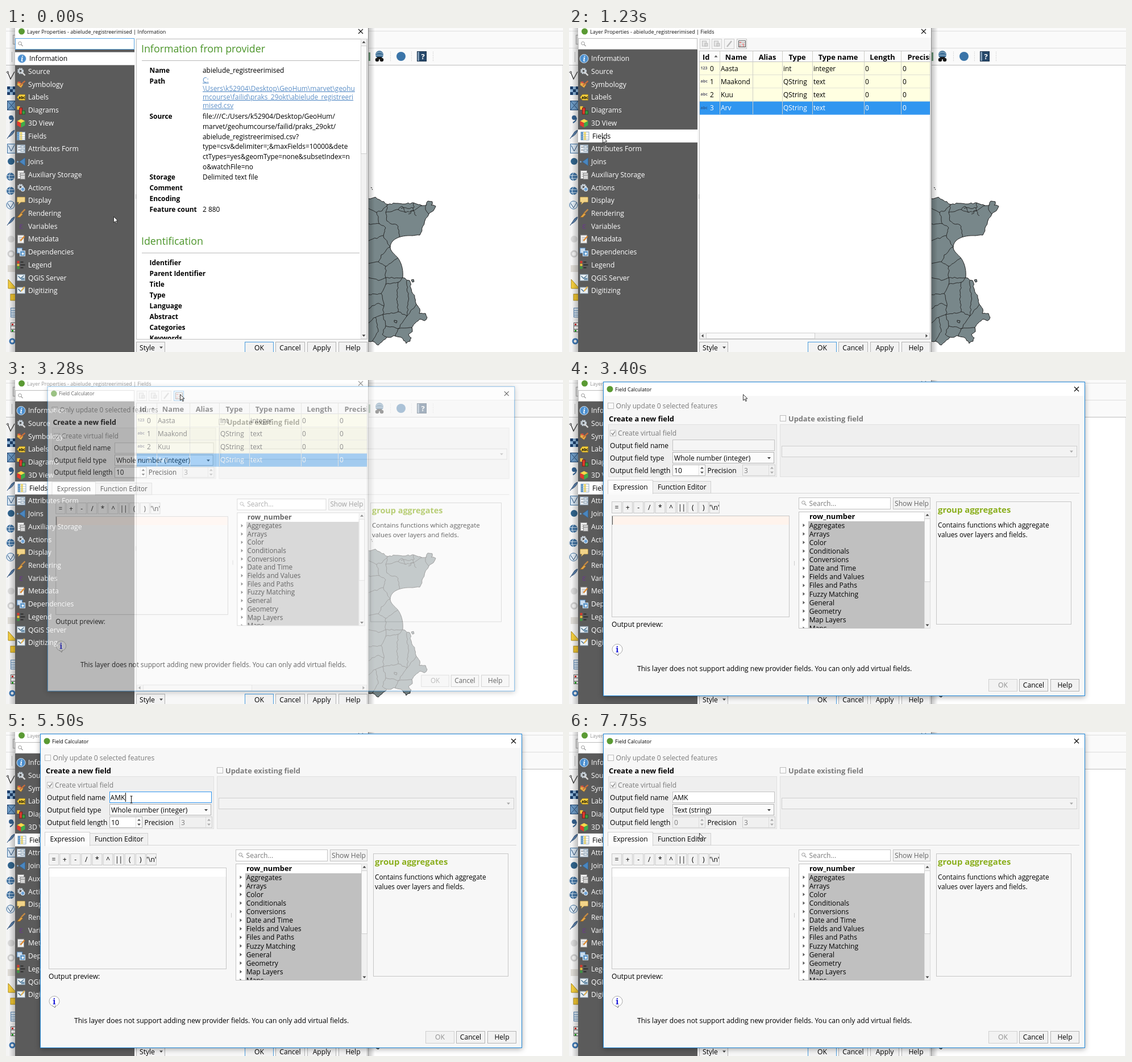
Animation, 980 px wide and 571 px high, one loop 8000 ms. Source, as an HTML page:

```html
<!DOCTYPE html>
<html lang="en">
<head>
<meta charset="utf-8">
<title>Field calculator</title>
<style>
html, body { margin: 0; width: 100%; height: 100%; overflow: hidden; background: #fff; }
svg { display: block; font: 12.1px "Open Sans", "Noto Sans", sans-serif; }
text { white-space: pre; }
</style>
</head>
<body>
<svg id="stage" width="980" height="571" viewBox="0 0 980 571"></svg>
<script>
const LOOP = 8000, GREY = '#7b7b7b', BLUE = '#3096f0', LINE = '#c3c3c3';

const esc = s => s.replace(/&/g, '&amp;').replace(/</g, '&lt;');
const text = (x, y, s, o = '') => `<text x="${x}" y="${y}" ${o}>${esc(s)}</text>`;
const bold = (x, y, s, size = 12.8, fill = '#000') =>
  text(x, y, s, `font-weight="700" font-size="${size}" fill="${fill}"`);
const mid = (x, y, s, o = '') => text(x, y, s, 'text-anchor="middle" ' + o);
const rect = (x, y, w, h, fill, stroke = 'none', o = '') =>
  `<rect x="${x}" y="${y}" width="${w}" height="${h}" fill="${fill}" stroke="${stroke}" ${o}/>`;
const box = (x1, y1, x2, y2, fill = '#fff', stroke = LINE, o = '') =>
  rect(x1 + .5, y1 + .5, x2 - x1 - 1, y2 - y1 - 1, fill, stroke, o);
const circle = (x, y, r, fill, o = '') => `<circle cx="${x}" cy="${y}" r="${r}" fill="${fill}" ${o}/>`;
const path = (d, stroke, w = 1, fill = 'none') =>
  `<path d="${d}" stroke="${stroke}" stroke-width="${w}" fill="${fill}"/>`;
const group = (id, s, o = '') => `<g id="${id}" ${o}>${s}</g>`;
const at = (x, y, s) => `<g transform="translate(${x} ${y})">${s}</g>`;
const tri = (x, y, dir, fill = '#444') => {
  const turn = { down: 0, left: 90, up: 180, right: 270 }[dir];
  return `<path transform="translate(${x} ${y}) rotate(${turn})" d="M-3-1.5H3L0 2z" fill="${fill}"/>`;
};
const lens = (x, y) => circle(x, y, 2.8, 'none', 'stroke="#999"') + path(`M${x + 2} ${y + 2}l3 3`, '#999', 1.3);
const cross = (x, y) => path(`M${x - 4} ${y - 4}l8 8m0-8l-8 8`, 'currentColor', 1.1);
const button = (x1, x2, y, s, stroke = '#b4b4b4', fill = '#000') =>
  box(x1, y, x2, y + 22, '#f2f2f2', stroke) + mid((x1 + x2) / 2, y + 15, s, `fill="${fill}"`);

// ---- main window behind the dialogs ----
let seed = 11;
const rnd = () => (seed = seed * 16807 % 2147483647) / 2147483647 - .5;
function rough(list) {
  const p = list.split(' ').map(s => s.split(',').map(Number));
  let d = 'M' + p[0];
  for (let i = 1; i < p.length; i++) {
    const [a, b] = [p[i - 1], p[i]];
    const n = Math.max(1, Math.round(Math.hypot(b[0] - a[0], b[1] - a[1]) / 4));
    for (let k = 1; k <= n; k++) {
      const j = k < n ? 2.8 : 0, f = k / n;
      d += `L${(a[0] + (b[0] - a[0]) * f + rnd() * j).toFixed(1)} ${(a[1] + (b[1] - a[1]) * f + rnd() * j).toFixed(1)}`;
    }
  }
  return d;
}
const coast = '630,304 641,301 650,298 658,303 672,311 686,309 703,310 717,308 732,313 740,311 742,305 750,306 748,312 756,314 752,322 744,328 738,337 733,350 728,365 715,366';
const coast2 = 'C700 365 676 369 676 387C677 396 688 401 692 409C697 418 699 428 698 440L';
const south = '698,440 710,445 713,460 719,475 722,487 728,495 727,503 738,503 741,510 736,516 728,513 720,520 714,528 715,535 708,540 713,546 711,552 704,556 695,545 685,543 670,545 664,550 655,559 645,552 630,551';
const borders = [
  '638,318 652,325 662,322 672,311', '652,325 657,345 668,352 664,366 676,386', '638,345 657,345',
  '668,325 690,320 703,325 717,322 732,313', '690,320 697,314 703,325', '717,308 717,322 708,328', '695,318 717,317',
  '672,311 668,325 670,340 690,350 692,368', '717,322 722,331', '740,311 738,320 744,328',
  '638,375 664,366', '638,415 655,412 660,400 676,386', '655,412 668,420 680,412 690,405',
  '638,440 655,445 668,440 698,440', '668,420 668,452 690,448 698,440', '638,470 660,468 668,452',
  '660,468 665,490 663,505 690,500 705,508 722,487', '690,448 688,470 690,500', '705,445 708,480 705,508',
  '638,495 655,485 665,490', '638,520 650,510 663,505 668,525 690,530 715,528',
  '650,510 655,535 645,552', '668,525 662,540 670,545', '685,543 690,530 700,515 705,508'
];
const land = path(rough(coast) + coast2 + rough(south).slice(1) + 'z', '#222', 1, '#78878a') +
  borders.map(b => path(rough(b), '#222', .9)).join('') +
  path('M713 444l4-1 1 4-3 1zM683 515l5 1-1 4-4-2z', '#222', 1, '#78878a') +
  path('M642 281l2 1M644 284l1 1', '#333', 1.3);

const globe = y => circle(8, y, 7, '#3d6f9e') + path(`M2 ${y - 2}h12M3 ${y + 3}h11M8 ${y - 7}q-5 7 0 14`, '#dbe8f2');
const feather = y => path(`M2 ${y + 8}L10 ${y - 4}Q14 ${y - 7} 15 ${y - 7}Q14 ${y} 5 ${y + 5}`, '#34547a', 1, '#5c81ab');
let tools = path('M3 78l5 12 7-13', '#333', 1.3) + circle(3, 78, 1.5, '#fff', 'stroke="#333"');
for (let i = 0; i < 9; i++) tools += rect(2 + i % 3 * 5, 103 + (i / 3 | 0) * 5, 5, 5, i % 2 ? '#8db3d6' : '#1d3f6b');
tools += box(2, 128, 18, 145, '#6f9cc6', '#274b75') + path('M3 129l13 15m0-15l-13 15', '#274b75') +
  circle(9, 158, 4, '#34618f') + path('M13 158q0 6-6 9', '#34618f', 2) + feather(187) +
  box(2, 204, 18, 221, '#d8e6f2', '#3d6f9e') + path('M4 207l5 10 6-11', '#274b75') +
  circle(9, 235, 6, '#31648c') + globe(262) + globe(287) +
  circle(8, 312, 7, '#e4eef6', 'stroke="#3d6f9e"') + path('M3 309l5 8 6-10', '#274b75') + feather(340) +
  circle(9, 372, 6, '#d9d9d9') + circle(9, 398, 5, 'none', 'stroke="#cfcfcf" stroke-width="3"') +
  rect(3, 418, 14, 12, '#dcd9d4') + path('M4 443v16h14z', '#a98a1c', 1, '#f6cf3d') +
  rect(8, 469, 10, 11, '#f3c832', '#a98a1c') +
  box(8, 493, 18, 510, '#dce8f3', '#5e87b0') + path('M9 498h8m-8 4h8m-8 4h8', '#5e87b0') +
  box(8, 519, 18, 536, '#fff', '#666') + path('M9 525h8m-8 6h8', '#555') + rect(10, 521, 3, 3, '#c22') + rect(10, 532, 3, 3, '#2a2') +
  circle(11, 552, 4, 'none', 'stroke="#3d78b5" stroke-width="3"');

const main = rect(0, 0, 980, 571, '#fff') + rect(0, 0, 980, 65, '#fafafa') + rect(0, 65, 16, 506, '#f4f4f4') +
  path('M0 5.5H980M0 35.5H980', '#dedede') + path('M0 65.5H980', '#bdbdbd') + path('M979.5 66V571', '#e6e6e6') +
  box(12, 12, 24, 29, '#eee', '#aaa') + path('M10.5 42v18', '#bbb', 1) + tools + land +
  [676.5, 713.5, 751.5].map(x => `<path d="M${x} 42v17" stroke="#bbb" stroke-dasharray="1 2"/>`).join('') +
  rect(636, 43, 5, 15, '#6d9a7a') +
  circle(657, 47, 7, '#3f6f96') + path('M651 45q6-5 12 0M650 48h14', '#a7c3d8') +
  circle(653, 56, 3.3, '#181818') + circle(661, 56, 3.3, '#181818') + rect(653, 51, 8, 4, '#181818') +
  circle(695, 50, 8, '#3a74a8') +
  box(723, 41, 740, 59, '#27496b', '#172f48') + rect(724, 42, 3, 16, '#7f9bb5') + mid(733.5, 55, '?', 'fill="#fff" font-weight="700" font-size="13"');

// ---- sidebar ----
const cube = path('M8 1l7 3.5-7 3.5-7-3.5z', 'none', 0, '#f7d94a') + path('M1 4.5l7 3.5v8l-7-4z', 'none', 0, '#e23b2e') + path('M15 4.5l-7 3.5v8l7-4z', 'none', 0, '#3fae49');
const sheet = rect(2, 1, 11, 14, '#f4f4f4', '#999') + path('M4 5h7M4 8h7M4 11h5', '#999');
const brush = path('M15 1L8 8', '#c48a45', 2.5) + path('M8 7l3 3-5 5H1z', '#8a5a1e', .8, '#e0a346');
const mapTile = rect(1, 2, 14, 11, '#e8eef2', '#8195a5') + path('M3 5l4 4 6-5', '#49718f', 1.4);
const gear = circle(7, 7, 4, 'none', 'stroke="#c9d2da" stroke-width="3" stroke-dasharray="2.2 1"') + circle(7, 7, 3, 'none', 'stroke="#c9d2da" stroke-width="2"');
const items = [
  ['Information', circle(8, 8, 7.5, '#4c8fcf', 'stroke="#d9e8f5"') + mid(8, 12.5, 'i', 'fill="#fff" font-family="Noto Serif, serif" font-style="italic" font-weight="700" font-size="12"')],
  ['Source', gear + path('M9 9l6 6', '#d8d8d8', 2.4)],
  ['Symbology', path('M2 3l10 5-4 6-7-5z', '#8a5a1e', .6, '#e7b24c') + path('M15 2L6 10', '#c96c3a', 2.5) + rect(3, 3, 4, 3, '#d94f45')],
  ['Labels', path('M1 8l4-5h10v10h-10z', '#a88415', .7, '#f6cf3d') + mid(9.5, 10.5, 'abc', 'font-size="6.5" font-weight="700"')],
  ['Diagrams', rect(1, 1, 5, 6, '#f0c53a') + rect(5, 4, 5, 11, '#d93a2f', '#7e1b14') + rect(10, 9, 5, 6, '#3c9a44', '#1f5a25')],
  ['3D View', cube],
  ['Fields', rect(1, 1, 14, 14, '#fff', '#8aa5bd') + rect(1, 1, 4, 14, '#5f97c9') + rect(6, 1, 4, 14, '#f3dc73') + path('M1 5h14M1 9h14M1 12h14', '#9fb4c6', .7)],
  ['Attributes Form', rect(1, 1, 14, 14, '#e8edf2', '#8aa0b5') + path('M3 5h3M3 10h3', '#555') + rect(7.5, 3, 6, 3, '#fff', '#6b87a0') + rect(7.5, 9, 6, 3, '#fff', '#6b87a0')],
  ['Joins', path('M5 8L15 1v14z', '#2c5f92', .7, '#4a86bf') + circle(2, 8, 1.5, '#7fa9cf')],
  ['Auxiliary Storage', sheet + rect(7, 5, 8, 11, '#d5d5d5', '#888') + path('M7 9h8', '#888')],
  ['Actions', gear + circle(11, 11, 3.5, '#6fa3d6', 'stroke="#fff"')],
  ['Display', path('M2 2h12q1 0 1 1v7q0 1-1 1H8l-5 4 1-4H2q-1 0-1-1V3q0-1 1-1z', '#a88738', .7, '#f2d489')],
  ['Rendering', brush],
  ['Variables', mid(8, 13, 'ε', 'font-size="15" fill="#6a3c8a"')],
  ['Metadata', sheet + path('M14 3L7 11', '#e08a2e', 2.2)],
  ['Dependencies', rect(1, 1, 9, 9, '#c9dcee', '#4a7fb5') + rect(6, 6, 9, 9, '#5f97c9', '#dce9f4') + circle(11, 11, 2, '#fff')],
  ['Legend', rect(1, 1, 4, 4, '#d93a2f') + rect(1, 6, 4, 4, '#e9c23b') + rect(1, 11, 4, 4, '#3c9a44') + path('M7 3h5M7 8h8M7 13h5', '#222', 1.5)],
  ['QGIS Server', mapTile + rect(8, 8, 6, 4, '#6f93ae')],
  ['Digitizing', mapTile + path('M14 1L8 9', '#e7b24c', 2)]
];
const rowY = i => 54 + 22.72 * i;
const side = sel => items.map(([name, icon], i) => {
  const on = i === sel, y = rowY(i);
  return (on ? rect(16, y - 11.4, 210, 22.8, '#fff') : '') + at(on ? 20 : 18.5, y - 8, icon) +
    text(on ? 41 : 39, y + 4.3, name, `fill="${on ? '#000' : '#fff'}"`);
}).join('');

// ---- information page ----
const field = (y, name, ...lines) => bold(252.5, y + 4.3, name, 11.9) +
  lines.map((s, i) => text(346, y + 4.3 + i * 17.7, s, 'font-size="11.9"')).join('');
const heading = (y, s) => text(238, y, s, 'font-size="17.8" fill="#4a9428"') + path(`M239 ${y + 14}.5H622`, '#b9b9b9');
const link = ['C:', '\\Users\\k52904\\Desktop\\GeoHum\\marvet\\geohu', 'mcourse\\failid\\praks_29okt\\abielude_registreeri', 'mised.csv'];
const vBar = (x, y1, y2, thumb) => box(x, y1, x + 11, y2, '#f1f1f1', '#dcdcdc') + box(x, y1 + 12, x + 11, thumb, '#fafafa', '#cfcfcf') +
  tri(x + 5.5, y1 + 6, 'up') + tri(x + 5.5, y2 - 6, 'down');
const info = box(229, 19, 636, 549) + '<clipPath id="clip"><rect x="230" y="20" width="394" height="528"/></clipPath>' +
  group('doc', heading(43, 'Information from provider') + field(75, 'Name', 'abielude_registreerimised') + field(94, 'Path') +
    link.map((s, i) => text(346, 95.5 + i * 15.2, s, 'font-size="11.9" fill="#5d90c8" text-decoration="underline"')).join('') +
    field(156, 'Source', 'file:///C:/Users/k52904/Desktop/GeoHum/', 'marvet/geohumcourse/failid/praks_29okt/', 'abielude_registreerimised.csv?',
      'type=csv&delimiter=;&maxFields=10000&dete', 'ctTypes=yes&geomType=none&subsetIndex=n', 'o&watchFile=no') +
    field(263, 'Storage', 'Delimited text file') + field(282, 'Comment') + field(301, 'Encoding') + field(320, 'Feature count', '2 880') +
    heading(382, 'Identification') +
    ['Identifier', 'Parent Identifier', 'Title', 'Type', 'Language', 'Abstract', 'Categories', 'Keywords'].map((s, i) => field(414 + 19 * i, s)).join(''),
    'clip-path="url(#clip)"') + vBar(624, 19, 548, 222);

// ---- fields page ----
const cols = [229, 265, 323, 375, 428, 519, 584, 635];
const rows = [['Aasta', 'int', 'integer'], ['Maakond', 'QString', 'text'], ['Kuu', 'QString', 'text'], ['Arv', 'QString', 'text']];
const abacus = rect(298.5, 22.5, 12, 11, '#fff', '#555') + path('M299 25.5h11M299 28.5h11M299 31.5h11', '#777', .8) +
  path('M300 25.5h3M305 28.5h3M300 31.5h2M306 31.5h2', '#c44', 1.4);
const dull = [239, 260, 282].map((x, i) => box(x - 9, 19, x + 9, 37, '#f4f4f4', '#cfcfcf') +
  (i < 2 ? rect(x - 4.5, 23, 7, 9, '#e6e6e6', '#bbb') + rect(x, 27, 5, 5, '#d9d9d9', '#bbb') : path(`M${x + 4} 23l-8 10`, '#bbb', 2.4))).join('');
const table = dull + box(295, 19, 313, 37, '#f4f4f4', '#c4c4c4', 'id="calcBtn"') + abacus +
  box(229, 40, 636, 549) + rect(230, 41, 405, 19, '#fbfbfb') + path('M230 59.5H635', LINE) +
  rows.map((r, i) => {
    const y = 60 + 23.2 * i, on = i === 3, b = y + 15.5, o = `font-size="11.9" fill="${on ? '#fff' : '#000'}"`;
    return rect(230, y, 405, 23.2, on ? BLUE : '#ffffe1') + path(`M230 ${y + 22.7}H635`, on ? '#5aaaf2' : '#d9d9cf') +
      text(231.5, b - 2.5, i ? 'abc' : '123', `font-size="7" font-weight="700" fill="${on ? '#2a5f9c' : '#5c5c70'}"`) +
      text(248, b, '' + i, o) + text(267, b, r[0], o) + text(377, b, r[1], o) + text(430, b, r[2], o) + text(521, b, '0', o) + text(587, b, '0', o);
  }).join('') + cols.slice(1, 7).map(x => path(`M${x}.5 41V152`, '#cfcfc8')).join('') +
  bold(235, 55.5, 'Id') + tri(258.5, 50, 'up', '#555') +
  ['Name', 'Alias', 'Type', 'Type name', 'Length'].map((s, i) =>
    mid((cols[i + 1] + cols[i + 2]) / 2, 55.5, s, 'font-weight="700" font-size="12.8"')).join('') +
  '<svg x="585" y="41" width="50" height="19">' + bold(10.5, 14.5, 'Precision') + '</svg>' +
  box(230, 537, 635, 548, '#f1f1f1', '#dcdcdc') + box(241, 537, 433, 548, '#fafafa', '#cfcfcf') + tri(235, 542.5, 'left') + tri(629, 542.5, 'right');

const titleText = (id, page) => text(37, 9.5, 'Layer Properties - abielude_registreerimised | ' + page, `id="${id}" font-size="9" fill="currentColor"`);
const shade = (x, dir) => [0, 1, 2, 3, 4].map(i => rect(dir < 0 ? x - i * 2 - 2 : x + i * 2, 0, 2, 571, '#000', 'none', `opacity="${.2 - i * .04}"`)).join('');
const props = shade(16, -1) + shade(638, 1) + rect(16, 0, 622, 571, '#f7f7f7') + path('M637.5 0V571', '#8a8a8a') +
  rect(16, 0, 621, 17, '#fff') + circle(27.5, 6, 5.5, '#5a9a33') +
  group('title', titleText('titleA', 'Information') + titleText('titleB', 'Fields') + cross(624, 6)) +
  box(16, 18, 226, 38, '#fff', '#c0c0c0', 'id="find"') + lens(24.5, 27) +
  rect(16, 38, 210, 533, '#5b5b5b') + path('M228.5 293v8', '#ccc') +
  group('pageA', side(0) + info) + group('pageB', side(6) + table) +
  button(229, 280, 553, '') + text(235, 568, 'Style') + tri(273, 563, 'down') +
  button(420, 471, 553, 'OK', '#4a9de0') + button(474, 526, 553, 'Cancel') + button(530, 581, 553, 'Apply') + button(585, 636, 553, 'Help');

// ---- field calculator ----
const check = (x, y) => box(x, y, x + 11, y + 11, '#fafafa', '#bcbcbc');
const spin = (x, y, off) => box(x, y, x + 58, y + 20, off ? '#f0f0f0' : '#fff', off ? '#cfcfcf' : '#b4b4b4') + path(`M${x + 46}.5 ${y + 1}v18`, '#ddd') +
  tri(x + 52, y + 6, 'up', off ? '#aaa' : '#555') + tri(x + 52, y + 14, 'down', off ? '#aaa' : '#555');
const ops = ['=', '+', '-', '/', '*', '^', '||', '(', ')', "'\\n'"];
const groups = ['Aggregates', 'Arrays', 'Color', 'Conditionals', 'Conversions', 'Date and Time', 'Fields and Values', 'Files and Paths',
  'Fuzzy Matching', 'General', 'Geometry', 'Map Layers', 'Maps'];
const calc = rect(60.5, 3.5, 847, 553, '#f7f7f7', '#1f86d8', 'style="filter:drop-shadow(0 2px 5px #0005)"') + rect(61, 4, 846, 24, '#fff') +
  circle(72, 16, 5.5, '#5a9a33') + text(81, 19.5, 'Field Calculator', 'font-size="9"') + cross(893, 16) +
  check(68, 40) + text(82.5, 50.3, 'Only update 0 selected features', `fill="${GREY}"`) +
  bold(70, 73, 'Create a new field') + box(69, 78, 366, 171, '#efefef', '#e0e0e0') +
  check(371, 62) + bold(386, 73, 'Update existing field', 12.8, GREY) + box(371, 78, 898, 171, '#efefef', '#e0e0e0') +
  box(374, 116, 894, 136, '#f3f3f3', '#cfcfcf') + tri(884, 126, 'down', '#aaa') +
  check(72, 88) + path('M74.5 93.5l2.5 3 4-6', '#888', 1.4) + text(86, 98, 'Create virtual field', `fill="${GREY}"`) +
  text(72, 119.5, 'Output field name') + text(72, 141.7, 'Output field type') + text(72, 164, 'Output field length') +
  box(182, 105, 362, 125, '#f5f5f5', LINE, 'id="nameBox"') + text(183.5, 119.7, '', 'id="name"') +
  box(182, 127, 361, 147, '#fbfbfb', '#b4b4b4') + text(185, 141.7, '', 'id="type"') + tri(352, 137.5, 'down') +
  group('lenOn', spin(182, 149) + text(185, 164, '10')) + group('lenOff', spin(182, 149, 1) + text(185, 164, '0', `fill="${GREY}"`)) +
  text(243.5, 164, 'Precision') + spin(305, 149, 1) + text(308, 164, '3', `fill="${GREY}"`) +
  path('M68 199.5H898', '#d5d5d5') + box(147, 178, 250, 200, '#f0f0f0', '#d0d0d0') + box(68, 176, 148, 201, '#fcfcfc', '#d0d0d0') + rect(69, 198, 78, 4, '#fafafa') +
  text(77.5, 193, 'Expression') + text(156, 193, 'Function Editor') +
  ops.map((s, i) => box(75 + 19.1 * i, 214, 93 + 19.1 * i, 235, '#f2f2f2', '#c8c8c8') + mid(84 + 19.1 * i, 229, s)).join('') +
  box(75, 239, 388, 418, '#f7f7f7', '#c6c6c6') + rect(76, 240, 311, 15, '#fff', 'none', 'id="active"') + rect(76, 240, 1, 15, '#555', 'none', 'id="caret0"') +
  text(75, 434.5, 'Output preview:') +
  circle(85, 474.5, 9, '#fff', 'stroke="#aaa"') + path('M82 482l4 4 1-4', '#777', 1, '#fff') + mid(85, 480, 'i', 'font-family="Noto Serif, serif" font-weight="700" font-size="15" fill="#1c1cd8"') +
  text(120, 512.7, 'This layer does not support adding new provider fields. You can only add virtual fields.') +
  path('M396.5 319v8', '#ccc') + box(404, 207, 566, 228) + lens(412.5, 216) + text(422.5, 221.7, 'Search...', `fill="${GREY}"`) +
  box(570, 207, 636, 228, '#f2f2f2', '#c4c4c4') + mid(603, 221.7, 'Show Help', 'fill="#666"') +
  box(404, 232, 636, 438) + rect(421, 249, 204, 188, '#c0c0c0') + bold(423, 245.3, 'row_number') +
  '<svg x="405" y="233" width="220" height="204">' + groups.map((s, i) => text(17.7, 27.5 + 15.13 * i, s) + tri(8, 23 + 15.13 * i, 'right', '#555')).join('') + '</svg>' +
  vBar(625, 232, 438, 356) +
  box(646, 214, 884, 431, '#f7f7f7', '#c6c6c6') + bold(649, 233.7, 'group aggregates', 14.9, '#8aae1c') +
  text(649, 259.5, 'Contains functions which aggregate', 'font-size="11.8"') + text(649, 277, 'values over layers and fields.', 'font-size="11.8"') +
  button(738, 789, 527, 'OK', '#cfcfcf', '#8f8f8f') + button(792, 843, 527, 'Cancel') + button(847, 898, 527, 'Help');

const types = ['Whole number (integer)', 'Decimal number (double)', 'Text (string)', 'Date', 'Time', 'Date & Time',
  'Text, unlimited length (text)', 'Boolean', 'Binary object (BLOB)'];
const popup = box(182, 127, 363, 310, '#fff', '#8c8c8c', 'style="filter:drop-shadow(1px 1px .5px #0006)"') + rect(182, 127.5, 181, 20.3, BLUE, 'none', 'id="hover"') +
  types.map((s, i) => text(187, 142.4 + 20.2 * i, s, 'class="type" font-size="12.2"')).join('');

const arrow = path('M.5 .5v10.5l2.6-2.4 1.8 4 1.6-.7-1.8-4h3.3z', '#222', .9, '#fff');
const beam = path('M-2 -6h4M0 -6V6M-2 6h4', '#111');

document.getElementById('stage').innerHTML = main + group('props', props) + group('calc', calc) +
  '<clipPath id="drop"><rect id="dropBox" x="180" y="120" width="190" height="0"/></clipPath>' +
  group('popup', popup, 'clip-path="url(#drop)"') + rect(0, 107, 1, 16, '#000', 'none', 'id="caret"') +
  group('arrow', arrow) + group('beam', beam);

// ---- time ----
const $ = id => document.getElementById(id);
const show = (id, on) => $(id).setAttribute('visibility', on ? 'visible' : 'hidden');
const set = (id, key, v) => $(id).setAttribute(key, v);
const last = (keys, t) => keys.filter(k => k[0] <= t).pop();

const pointer = [
  [0, 189, 332], [140, 220, 271], [290, 170, 207], [440, 120, 197], [560, 78, 190], [710, 69, 191], [830, 63, 192], [950, 59, 192],
  [1790, 200, 115], [1910, 313, 50], [2060, 320, 46], [2180, 313, 33], [2300, 306, 25],
  [3820, 272, 60], [3940, 234, 99], [4090, 225, 112], [4240, 220.5, 119],
  [6150, 228, 125], [6270, 235, 132], [6910, 234, 132], [7060, 232, 155], [7180, 230, 170], [7310, 229, 178]
];
const typed = [[0, ''], [5230, 'A'], [5350, 'AM'], [5500, 'AMK']];
const dropHeight = [[0, 0], [6390, 100], [6510, 200], [7750, 0]];
const hovered = [[0, 0], [7060, 1], [7180, 2]];

function draw(t) {
  const fields = t >= 1230, open = t >= 3280, focus = t >= 4240 && t < 6270, chosen = t >= 7750;
  show('pageA', !fields); show('titleA', !fields);
  show('pageB', fields); show('titleB', fields);
  set('find', 'stroke', fields ? '#c0c0c0' : '#5aa7e8');
  set('title', 'color', t >= 3130 ? '#999' : '#111');
  set('calcBtn', 'stroke', t >= 2610 ? '#4a9de0' : '#c4c4c4');
  set('calcBtn', 'fill', t >= 2610 ? '#e3f0fb' : '#f4f4f4');

  show('calc', open);
  set('calc', 'opacity', t < 3400 ? .6 : 1);
  set('calc', 'transform', t < 3400 ? 'translate(483 280) scale(.97) translate(-483 -280)' : '');
  show('active', open);
  set('active', 'fill', t < 4390 ? '#fff3ec' : '#fff');
  show('caret0', open && t < 3670 || t >= 4090 && t < 4240);
  set('nameBox', 'stroke', focus ? BLUE : LINE);
  set('nameBox', 'fill', t >= 4240 ? '#fff' : '#f5f5f5');
  const name = last(typed, t)[1];
  $('name').textContent = name;
  set('caret', 'x', name ? 184 + Math.round($('name').getComputedTextLength()) : 183);
  show('caret', focus && (t < 4980 || t >= 5230));

  $('type').textContent = types[chosen ? 2 : 0];
  show('lenOn', open && !chosen);
  show('lenOff', chosen);
  const h = last(dropHeight, t)[1], row = last(hovered, t)[1];
  set('dropBox', 'height', h);
  show('popup', h > 0);
  set('hover', 'y', 127.5 + 20.2 * row);
  document.querySelectorAll('.type').forEach((e, i) => e.setAttribute('fill', i === row ? '#fff' : '#000'));

  const [, x, y] = last(pointer, t), inText = t >= 4090 && t < 6270;
  show('arrow', !inText); show('beam', inText);
  set(inText ? 'beam' : 'arrow', 'transform', `translate(${x} ${y})`);
}

let start;
function tick(now) {
  start ??= now;
  draw((now - start) % LOOP);
  requestAnimationFrame(tick);
}
draw(0);
requestAnimationFrame(tick);
</script>
</body>
</html>
```
